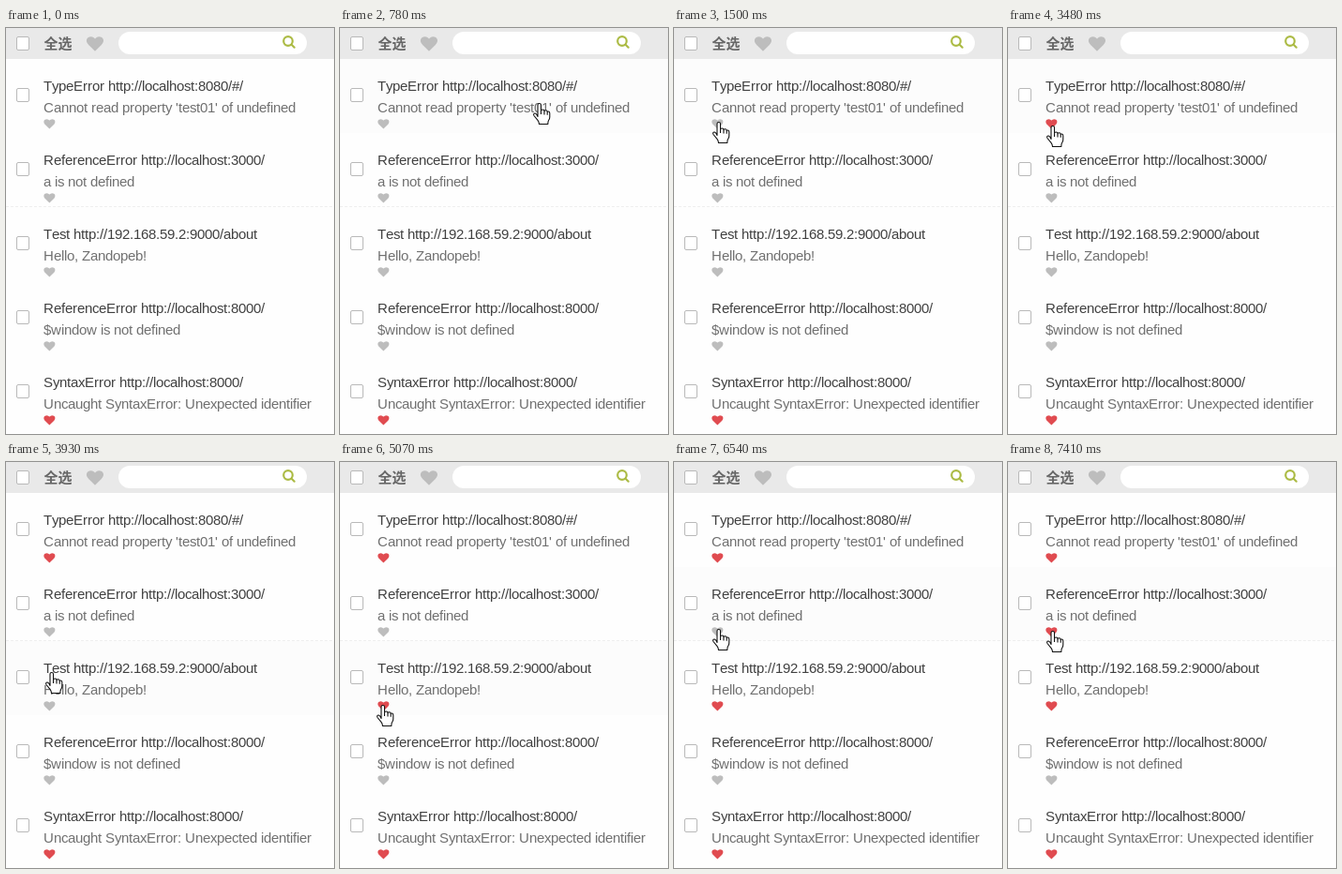
Animation, 350 px wide and 433 px high, one loop 8 s. Source, as an HTML page:

```html
<!DOCTYPE html>
<html lang="en">
<head>
<meta charset="utf-8">
<title>Error list</title>
<style>
  html, body { margin: 0; width: 100%; height: 100%; overflow: hidden; background: #fefefe; }
  svg { display: block; }
  text { font: 15px "Liberation Sans", Arial, sans-serif; }
  .title { fill: #404040; }
  .detail { fill: #707070; }
  .all { font: 700 15px "Noto Sans CJK SC", "Noto Sans CJK", sans-serif; fill: #666; }
  .box { fill: #fff; stroke: #b9b9b9; }
</style>
</head>
<body>
<svg width="350" height="433" viewBox="0 0 350 433">
  <defs>
    <path id="heart" d="M0 5.1L-4.4 .9C-7.4-2.1-5.9-5.1-2.8-5.1-1.6-5.1-.6-4.3 0-3.7.6-4.3 1.6-5.1 2.8-5.1 5.9-5.1 7.4-2.1 4.4 .9Z"/>
  </defs>
  <rect width="350" height="33" fill="#e9e9e9"/>
  <rect class="box" x="11.5" y="9.5" width="13" height="14" rx="1.5"/>
  <text class="all" x="40.5" y="21.5">全选</text>
  <use href="#heart" transform="translate(95 17) scale(1.5)" fill="#bdbdbd"/>
  <rect x="120" y="4" width="201" height="24" rx="12" fill="#fff"/>
  <g fill="none" stroke="#acbb45" stroke-width="2.2" stroke-linecap="round">
    <circle cx="301" cy="14" r="4.8"/>
    <path d="M304.7 17.7l3 3"/>
  </g>
  <g id="rows"></g>
  <path d="M0 190.5H350" stroke="#efefef" stroke-dasharray="3 2"/>
  <g id="hand" fill="#fff" stroke="#111" stroke-width="1.1" stroke-linejoin="round">
    <path d="M-2 14.5V2Q-2 .5-.3 .5 1.5 .5 1.5 2V8.5Q1.7 7 3.2 7 5 7 5 8.8 5.3 7.8 6.6 7.8 8 7.8 8.2 9.4 8.6 8.8 9.6 9 10.8 9.2 10.8 11V15Q10.8 17 9.6 18.5 8.8 19.7 8.8 22.5H-.5Q-.6 20-2 18.3L-6 13.5Q-7 12-5.8 11.2-4.6 10.6-3.3 12Z"/>
    <path d="M1.5 8.5V12M5 9V12.4M8.2 9.5V12.8" fill="none"/>
  </g>
</svg>
<script>
  const LOOP = 8000, TICK = 30, TOP = 33, ROW = 79;
  const GREY = '#bdbdbd', RED = '#e04b50';

  const items = [
    { title: 'TypeError http://localhost:8080/#/', detail: "Cannot read property 'test01' of undefined", redAt: 2250 },
    { title: 'ReferenceError http://localhost:3000/', detail: 'a is not defined', redAt: 7410 },
    { title: 'Test http://192.168.59.2:9000/about', detail: 'Hello, Zandopeb!', redAt: 5070 },
    { title: 'ReferenceError http://localhost:8000/', detail: '$window is not defined', redAt: Infinity },
    { title: 'SyntaxError http://localhost:8000/', detail: 'Uncaught SyntaxError: Unexpected identifier', redAt: 0 }
  ];

  // each move of the fingertip eases from wherever the last one ended
  const enter = { at: 600, x: 337, y: 42 };
  const moves = [
    { from: 570, to: 780, x: 213, y: 80 },
    { from: 990, to: 1170, x: 57, y: 88 },
    { from: 1170, to: 1500, x: 48, y: 100 },
    { from: 3450, to: 3720, x: 51, y: 204 },
    { from: 3840, to: 4050, x: 47, y: 255 },
    { from: 4350, to: 4380, x: 46, y: 259 },
    { from: 6060, to: 6330, x: 48, y: 182 },
    { from: 6450, to: 6540, x: 48, y: 178 },
    { from: 6900, to: 6990, x: 48, y: 180 }
  ];

  const svgNS = 'http://www.w3.org/2000/svg';
  function add(parent, tag, attrs, content = '') {
    const el = document.createElementNS(svgNS, tag);
    for (const key in attrs) el.setAttribute(key, attrs[key]);
    el.textContent = content;
    return parent.appendChild(el);
  }

  // sets each letter on a whole pixel, like hinted screen type
  const pen = document.createElement('canvas').getContext('2d');
  pen.font = '15px "Liberation Sans", Arial, sans-serif';
  function addText(parent, style, y, content) {
    let x = 40;
    const places = [...content].map(letter => {
      const place = x;
      x += Math.round(pen.measureText(letter).width - 0.05);
      return place;
    });
    add(parent, 'text', { class: style, x: places.join(' '), y }, content);
  }

  const list = document.getElementById('rows');
  const hand = document.getElementById('hand');
  const rows = items.map(({ title, detail, redAt }, i) => {
    const g = add(list, 'g', { transform: `translate(0 ${i * ROW})` });
    const back = add(g, 'rect', { y: TOP, width: 350, height: ROW });
    add(g, 'rect', { class: 'box', x: 11.5, y: 64.5, width: 13, height: 14, rx: 1.5 });
    addText(g, 'title', 67, title);
    addText(g, 'detail', 90, detail);
    const heart = add(g, 'use', { href: '#heart', transform: 'translate(46.4 102.3)' });
    return { back, heart, redAt };
  });

  const clamp = k => Math.min(1, Math.max(0, k));
  const ease = k => k * k * (3 - 2 * k);

  function fingertip(t) {
    let { x, y } = enter;
    for (const move of moves) {
      const k = ease(clamp((t - move.from) / (move.to - move.from)));
      x += (move.x - x) * k;
      y += (move.y - y) * k;
    }
    return { x: Math.round(x), y: Math.round(y) };
  }

  function draw(time) {
    const t = Math.floor((time % LOOP) / TICK) * TICK;
    const shown = t >= enter.at;
    const { x, y } = fingertip(t);
    const over = shown ? Math.floor((y - TOP) / ROW) : -1;
    rows.forEach(({ back, heart, redAt }, i) => {
      back.setAttribute('fill', i === over ? '#fcfcfc' : '#fefefe');
      heart.setAttribute('fill', t >= redAt ? RED : GREY);
    });
    hand.setAttribute('visibility', shown ? 'visible' : 'hidden');
    hand.setAttribute('transform', `translate(${x} ${y})`);
  }

  const start = performance.now();
  function loop() {
    draw(performance.now() - start);
    requestAnimationFrame(loop);
  }
  loop();
</script>
</body>
</html>
```
